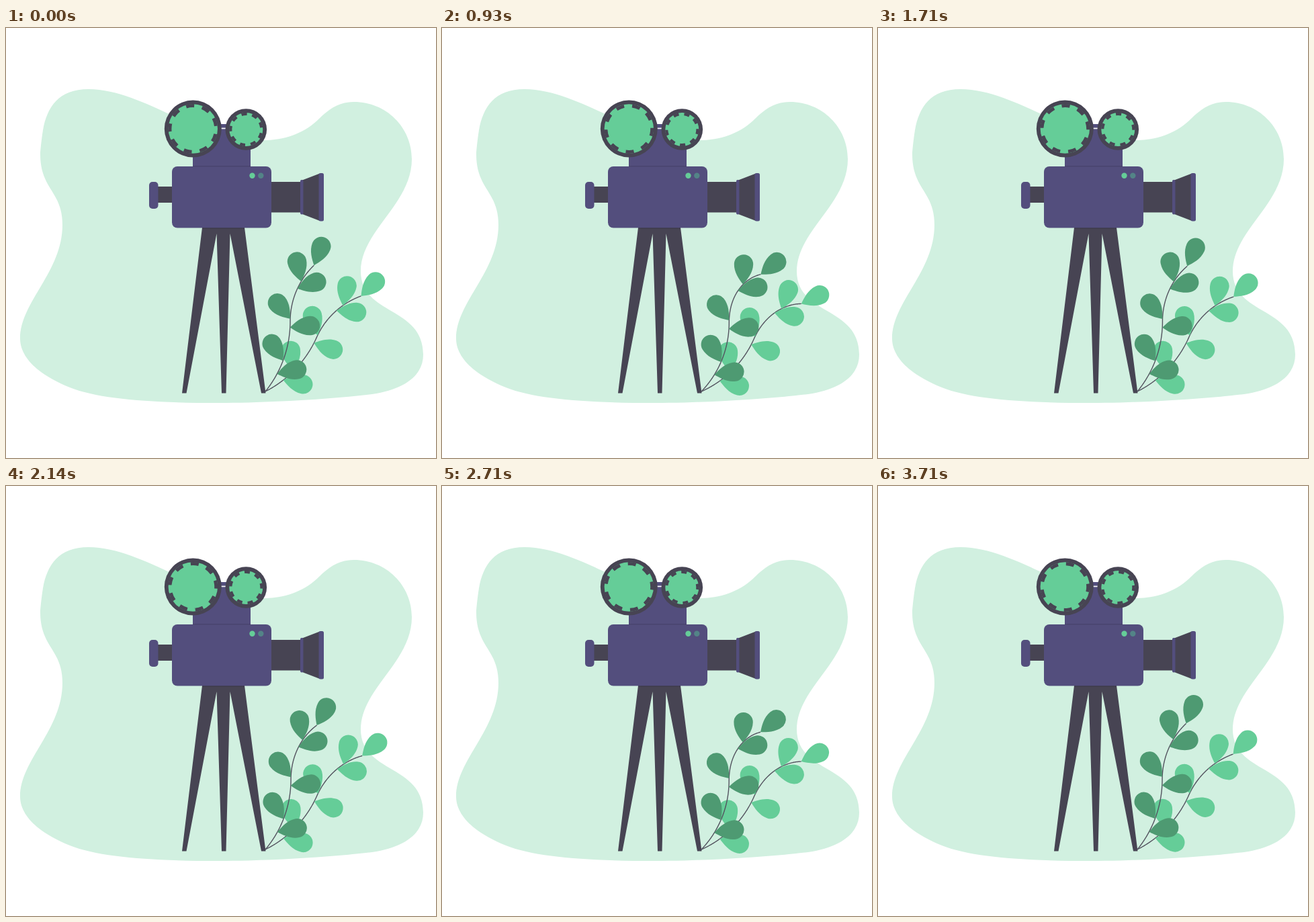
An HTML page for the animation above (3.78 s loop, 640 by 640 pixels).

```html
<!DOCTYPE html>
<html lang="en">
<head>
<meta charset="utf-8">
<title>Film camera</title>
<style>
  html, body { margin: 0; width: 100%; height: 100%; overflow: hidden; background: #fff; }
  svg { display: block; width: 100vw; height: 100vh; }
  .dark { fill: #474453; }
  .body { fill: #534e7d; }
  .mint { fill: #65cd98; }
  .moss { fill: #4e9a72; }
  .teeth { fill: none; stroke: #474453; stroke-dasharray: 1; }
  .stem { fill: none; stroke: #53535f; stroke-width: 1.4; }
</style>
</head>
<body>
<svg viewBox="0 0 640 640">
  <path fill="#d1f0e0" d="M123 91C165 91 210 113 245 129C300 155 340 168 388 167
    C420 166 447 154 466 135C482 119 497 110 518 110C566 110 604 148 604 195
    C604 262 528 302 528 362C528 428 621 414 621 486C621 518 592 538 545 545
    C480 553 380 558 318 558C220 558 140 553 95 535C55 519 21 494 21 462
    C21 408 84 363 84 293C84 243 51 240 51 188C51 182 53 165 55 152C61 118 78 91 123 91Z"/>

  <path class="dark" d="M292 297L262 543.5H268.5L313.5 306L321 543.5H327.5L333.5 306L380 543.5H386.5L355 297Z"/>
  <path class="body" d="M278 143H364V207H278Z"/>
  <path fill="#fff" d="M319 148.6H328V150.3H319Z"/>
  <rect class="dark" x="226" y="236" width="22" height="24"/>
  <rect class="body" x="213" y="229" width="13.5" height="40" rx="5"/>
  <rect class="dark" x="394" y="229" width="45" height="45.5"/>
  <path class="dark" d="M441 226.5L467 216.5V287L441 277Z"/>
  <rect class="body" x="438" y="226" width="4.5" height="51.5" rx="2"/>
  <rect class="body" x="465.5" y="216" width="7.5" height="71.5" rx="2.5"/>
  <rect class="body" x="247" y="206" width="148" height="91.5" rx="8"/>
  <path fill="#000" opacity=".15" d="M278 205.3H364V206.5H278ZM292 297.3H355V298.8H292Z"/>
  <circle class="mint" cx="366.5" cy="219.7" r="4.2"/>
  <circle fill="#538487" cx="379.3" cy="219.7" r="4.2"/>

  <g id="reels"></g>
  <g id="plants"></g>
</svg>
<script>
const LOOP = 3780, STEPS = 53, SWAYS = 2, TURNS = 3;
const RAD = Math.PI / 180;

function add(parent, tag, attrs) {
  const el = document.createElementNS('http://www.w3.org/2000/svg', tag);
  for (const k in attrs) el.setAttribute(k, attrs[k]);
  return parent.appendChild(el);
}

// Film reel: rim, disc and nine teeth
function makeReel(cx, cy, rim, w) {
  const g = add(document.getElementById('reels'), 'g', { transform: `translate(${cx} ${cy})` });
  const disc = rim - 5.8;
  add(g, 'circle', { class: 'dark', r: rim });
  add(g, 'circle', { class: 'mint', r: disc });
  return add(g, 'circle', { class: 'teeth', r: disc - w / 2 + .2, 'stroke-width': w, pathLength: 18 });
}
const reels = [makeReel(278.3, 150, 42.5, 5), makeReel(357.3, 151, 30.8, 4.2)];

// Place along the stem (0 to 2) and angle from it
const LEAVES = [[.28, 50], [.47, -54], [.92, 82], [1.04, -41], [1.54, 46], [1.67, -43], [2, -25]];
const LEAF = 'M0 0C7.5 -6 17.5 -14.2 30.3 -14.2A14.2 14.2 0 0 1 30.3 14.2C17.5 14.2 7.5 6 0 0Z';

function makePlant(color, lean, sway) {
  const g = add(document.getElementById('plants'), 'g', { transform: `translate(386 541) rotate(${lean})` });
  const stem = add(g, 'path', { class: 'stem' });
  const leaves = LEAVES.map(() => add(g, 'path', { class: color, d: LEAF }));
  return { stem, leaves, sway };
}
const plants = [makePlant('mint', 24, .62), makePlant('moss', 0, 1)];

// The stem turns left up to its middle, then curls right
function heading(u, bend) {
  if (u < 1) return -90 + (39 + 5 * bend) * (1 - u);
  const q = u - 1;
  return -90 + 46 * q + 31 * bend * q * q;
}

function growStem(bend) {
  const du = .01, points = [[0, 0]];
  let x = 0, y = 0;
  for (let i = 0; i < 200; i++) {
    const a = heading((i + .5) * du, bend) * RAD;
    const len = (i < 100 ? 113 : 93) * du;
    points.push([x += len * Math.cos(a), y += len * Math.sin(a)]);
  }
  return points;
}

function drawPlant({ stem, leaves, sway }, swing) {
  const bend = sway * swing, points = growStem(bend);
  stem.setAttribute('d', 'M' + points.join('L'));
  LEAVES.forEach(([u, angle], i) => {
    const [x, y] = points[Math.round(u * 100)];
    leaves[i].setAttribute('transform', `translate(${x} ${y}) rotate(${heading(u, bend) + angle})`);
  });
}

function draw(ms) {
  const step = Math.floor((ms + 3) % LOOP / LOOP * STEPS);
  const spin = 13 + 360 * TURNS * step / STEPS;
  for (const reel of reels) reel.setAttribute('transform', `rotate(${spin})`);

  const swing = Math.abs(Math.sin(Math.PI * SWAYS * (step + .25) / STEPS)) ** 1.7;
  for (const plant of plants) drawPlant(plant, swing);
}

const start = performance.now();
function tick() {
  draw(performance.now() - start);
  requestAnimationFrame(tick);
}
tick();
</script>
</body>
</html>
```
